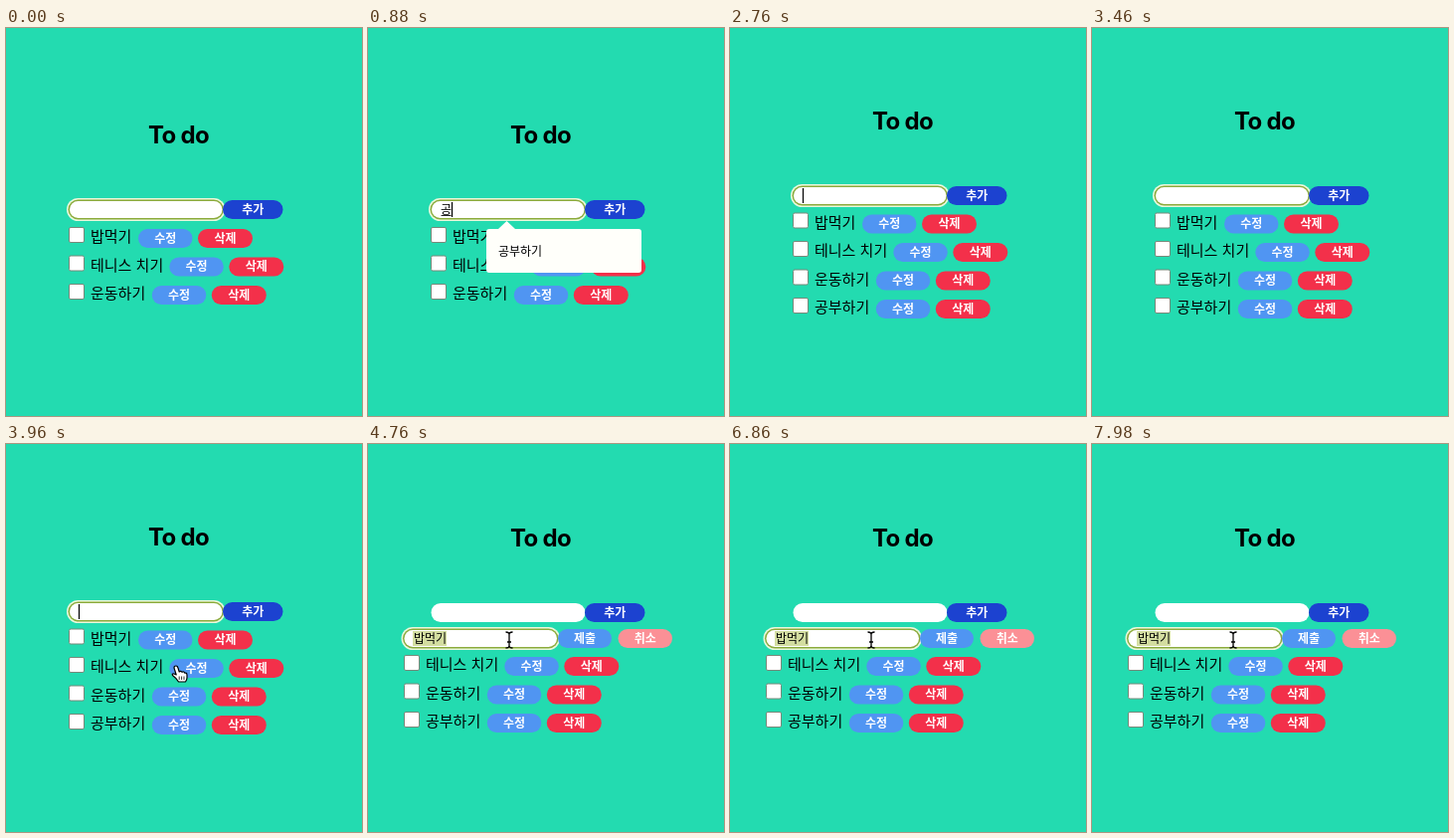
Write an HTML page that moves like this. It is 358x390 px and loops after 8 s.

```html
<!DOCTYPE html>
<html lang="ko">
<head>
<meta charset="utf-8">
<title>To do</title>
<style>
  html, body { margin: 0; width: 100%; height: 100%; overflow: hidden; background: #23dbb0; }
  svg { display: block; width: 358px; height: 390px; }
  text { font: 500 15px "Noto Sans CJK KR", "Noto Sans CJK", sans-serif; fill: #000; }
  .title { font: 700 24px Inter, sans-serif; letter-spacing: -.7px; text-anchor: middle; }
  .label { font-size: 12px; font-weight: 700; fill: #fff; text-anchor: middle; }
  .field { font-size: 12px; }
</style>
</head>
<body>
<svg id="stage" viewBox="0 0 358 390"></svg>
<script>
const LOOP = 8000, SUBMIT = 2480, EDIT = 4640;
const NAVY = '#1c42d0', BLUE = '#5095f2', RED = '#f3304a', PINK = '#fb9096';
const stage = document.getElementById('stage');

// Templates
const pill = (x, y, w, h, fill) =>
  `<rect x="${x}" y="${y}" width="${w}" height="${h}" rx="${h / 2}" fill="${fill}"/>`;
const text = (x, y, str, cls = '') => `<text x="${x}" y="${y}" class="${cls}">${str}</text>`;
const button = (x, y, w, str, fill) =>
  pill(x, y, w, 19, fill) + text(x + w / 2, y + 13.7, str, 'label');
const field = (x, y, focused) => focused
  ? pill(x - 3, y - 2, 159.5, 23, '#eaf8dc') + pill(x - 1.5, y - .5, 156.5, 20, '#8cab3c') + pill(x, y + 1, 153.5, 17, '#fff')
  : pill(x - .5, y, 155, 19, '#fff');
const header = (titleY, y, focused) =>
  text(173.5, titleY, 'To do', 'title') + field(64, y, focused) + button(218, y, 60.5, '추가', NAVY);

function row(x, y, str, editX) {
  return `<rect x="${x - .5}" y="${y - 1}" width="15" height="15" rx="1.5" fill="#fff" stroke="#77897a"/>` +
    text(x + 21, y + 13.7, str) +
    button(editX, y + .5, 54.5, '수정', BLUE) + button(editX + 60, y + .5, 55, '삭제', RED);
}

const items = [['밥먹기', 133], ['테니스 치기', 164.3], ['운동하기', 146.8], ['공부하기', 146.8]];
const rows = (list, x, y) =>
  list.map(([str, editX], i) => row(x, y + i * 28.5, str, editX + x - 64)).join('');
const group = (id, body) => `<g id="${id}">${body}</g>`;

stage.innerHTML =
  group('adding', header(116, 173, true) + rows(items.slice(0, 3), 64, 201.5)) +
  group('added', header(102, 159, true) + rows(items, 64, 187)) +
  group('editing', header(103, 160, false) + field(36.5, 186, true) +
    '<rect x="45" y="188" width="34" height="15" fill="#d3dda0"/>' + text(46, 199.7, '밥먹기', 'field') +
    button(191, 186, 54, '제출', BLUE) + button(251.5, 186, 54.5, '취소', PINK) +
    rows(items.slice(1), 37, 213.5)) +
  '<text id="typed" class="field" x="73" y="186.7"></text>' +
  '<path id="underline" stroke="#222"/><path id="caret" stroke="#000" stroke-width="1.2"/>' +
  group('popup', '<path d="M122 202H131L139.5 194L148 202H272Q275 202 275 205V243Q275 246 272 246H122Q119 246 119 243V205Q119 202 122 202Z" fill="#fffffa"/>' +
    text(131, 228.5, '공부하기', 'field')) +
  group('hand', '<path d="M-2 1Q-2-1 0-1Q1.5-1 2 1L3.2 5Q5 3.5 6 5.3Q8 4.3 8.8 6.2Q10.7 5.5 11 8L11 11Q11 13 9.5 15H2.5Q1 12-3.5 8.5Q-4.5 6.5-2 7L.2 8Z" fill="#fff" stroke="#000" stroke-width="1.2" stroke-linejoin="round"/><path d="M3.2 9.5V13M5.6 9.5V13M8 9.5V13" stroke="#000" stroke-width=".8"/>') +
  group('arrow', '<path d="M0 0V14L3.3 11L5.5 16L8 15L5.8 10.2H10Z" fill="#000" stroke="#fff"/>') +
  group('beam', '<path d="M-3.5-8Q0-8 0-5.5Q0-8 3.5-8M0-6V6M-3.5 8Q0 8 0 5.5Q0 8 3.5 8M-2 2H2" fill="none" stroke="#000" stroke-width="1.3"/>');

// [time, text, suggestion shown]
const typing = [
  [0, ''], [520, 'ㄱ'], [680, '고'], [840, '공', true], [1160, '공ㅂ'], [1280, '공부', true],
  [1480, '공붛'], [1640, '공부하', true], [1780, '공부학'], [1920, '공부하기'], [SUBMIT, '']
];
// [time, x, y] of the pointer
const path = [[3720, 214, 263], [3940, 171, 224], [4080, 171, 224], [4400, 142, 197], [LOOP, 142, 197]];

const el = id => document.getElementById(id);
const show = (id, on) => el(id).setAttribute('visibility', on ? 'visible' : 'hidden');

function pointerAt(t) {
  const i = path.findIndex(p => p[0] > t);
  const [t0, x0, y0] = path[i - 1], [t1, x1, y1] = path[i];
  const k = (t - t0) / (t1 - t0), e = k * k * (3 - 2 * k);
  return [x0 + (x1 - x0) * e, y0 + (y1 - y0) * e];
}

function overButton(x, y) {
  return items.some(([, left], i) => {
    const top = 187.5 + i * 28.5, dx = x - left;
    return y >= top && y <= top + 19 && (dx >= 0 && dx <= 54.5 || dx >= 60 && dx <= 115);
  });
}

function render(t) {
  show('adding', t < SUBMIT);
  show('added', t >= SUBMIT && t < EDIT);
  show('editing', t >= EDIT);

  const [since, str, suggest] = typing.filter(step => step[0] <= t).pop();
  const top = t < SUBMIT ? 175 : 161;
  const end = 73.5 + str.length * 11.04;
  const caretOn = since ? (t - since) % 1000 < 500 : t > 250;
  el('typed').textContent = str;
  el('underline').setAttribute('d', `M${end - 11} 188.5H${end - 1}`);
  el('caret').setAttribute('d', `M${end} ${top}v15`);
  show('underline', str);
  show('caret', t < EDIT && caretOn);
  show('popup', suggest);

  const moving = t >= path[0][0];
  const [x, y] = moving ? pointerAt(t) : [0, 0];
  const hand = overButton(x, y);
  for (const id of ['hand', 'arrow', 'beam']) el(id).setAttribute('transform', `translate(${x} ${y})`);
  show('hand', moving && t < EDIT && hand);
  show('arrow', moving && t < EDIT && !hand);
  show('beam', t >= EDIT);
}

const start = performance.now();
function tick() {
  render((performance.now() - start) % LOOP);
  requestAnimationFrame(tick);
}
tick();
</script>
</body>
</html>
```
